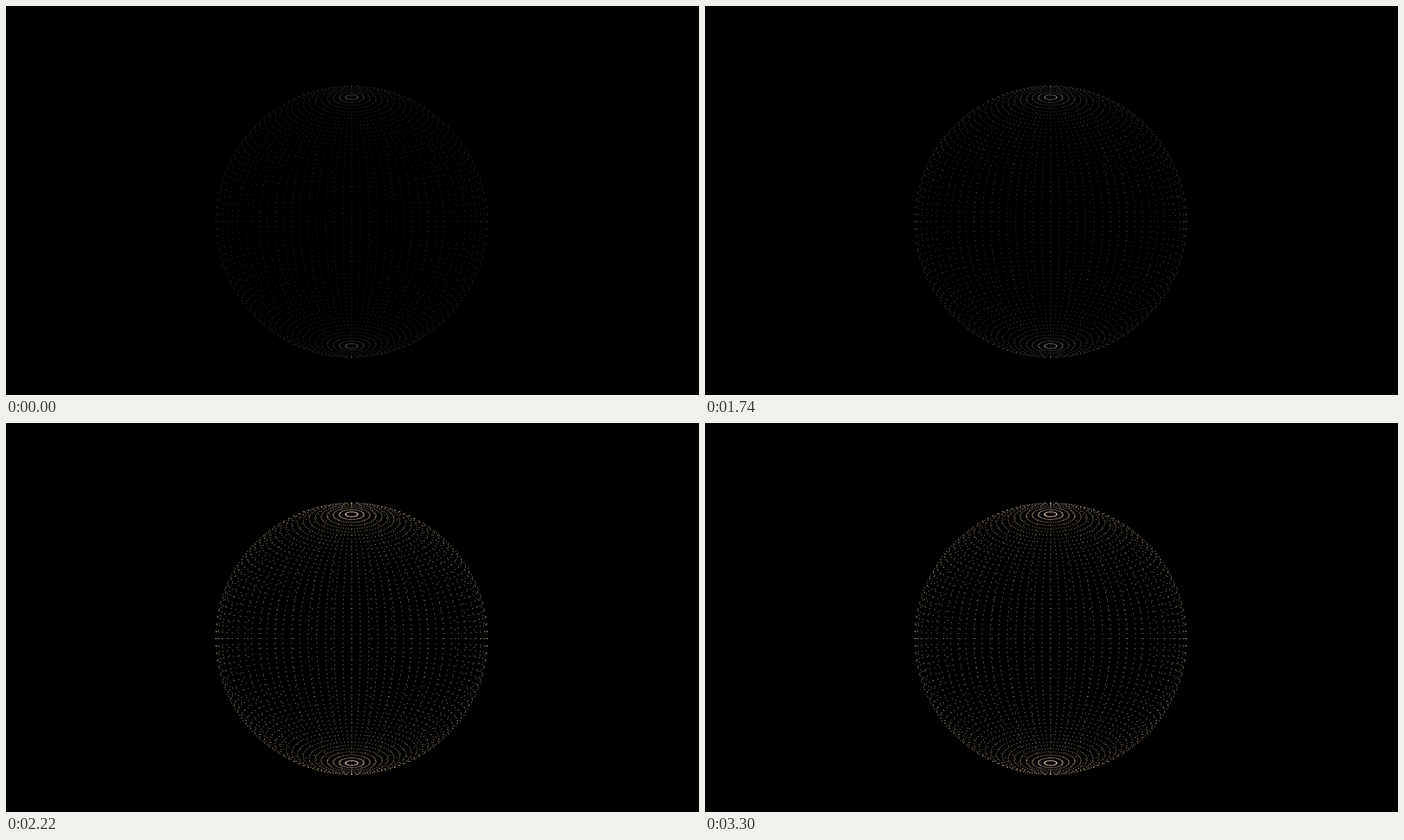
An HTML page with a canvas that plays this animation: 800 px wide and 450 px high, repeating every 3.66 s.

```html
<!DOCTYPE html>
<html lang="en">
<head>
<meta charset="utf-8">
<title>Dotted sphere</title>
<style>
  html, body { margin: 0; width: 100%; height: 100%; overflow: hidden; background: #000; }
  canvas { display: block; }
</style>
</head>
<body>
<canvas width="800" height="450"></canvas>
<script>
const ctx = document.querySelector('canvas').getContext('2d');
const LOOP = 3660, STEP = 60;
const FADE_START = 1710, FADE_END = 2220, DIM = 0.3;
const CENTER = { x: 399, y: 249.5 };
const SEGMENTS = 64, RADIUS = 2, CAMERA = 5, FOCAL = 360;

// Points on a latitude/longitude grid, seen in perspective from the equator.
const dots = [];
for (let row = 1; row < SEGMENTS; row++) {
  const polar = Math.PI * row / SEGMENTS;
  const ring = RADIUS * Math.sin(polar);
  for (let col = 0; col < SEGMENTS; col++) {
    const turn = 2 * Math.PI * col / SEGMENTS;
    const scale = FOCAL / (CAMERA - ring * Math.cos(turn));
    dots.push([
      CENTER.x + scale * ring * Math.sin(turn),
      CENTER.y - scale * RADIUS * Math.cos(polar)
    ]);
  }
}

const mix = (from, to, k) => Math.round(from + (to - from) * k);

function draw(time) {
  const progress = Math.min(1, Math.max(0, (time - FADE_START) / (FADE_END - FADE_START)));
  const glow = 1 - (1 - progress) ** 4;
  const alpha = 0.55 * (DIM + (1 - DIM) * glow);
  ctx.fillStyle = '#000';
  ctx.fillRect(0, 0, 800, 450);
  ctx.fillStyle = `rgba(${mix(225, 255, glow)}, ${mix(225, 226, glow)}, ${mix(225, 195, glow)}, ${alpha})`;
  for (const [x, y] of dots) ctx.fillRect(x - 0.5, y - 0.5, 1, 1);
}

const start = performance.now();
function tick() {
  const time = (performance.now() - start) % LOOP;
  draw(Math.floor(time / STEP) * STEP);
  requestAnimationFrame(tick);
}
tick();
</script>
</body>
</html>
```
